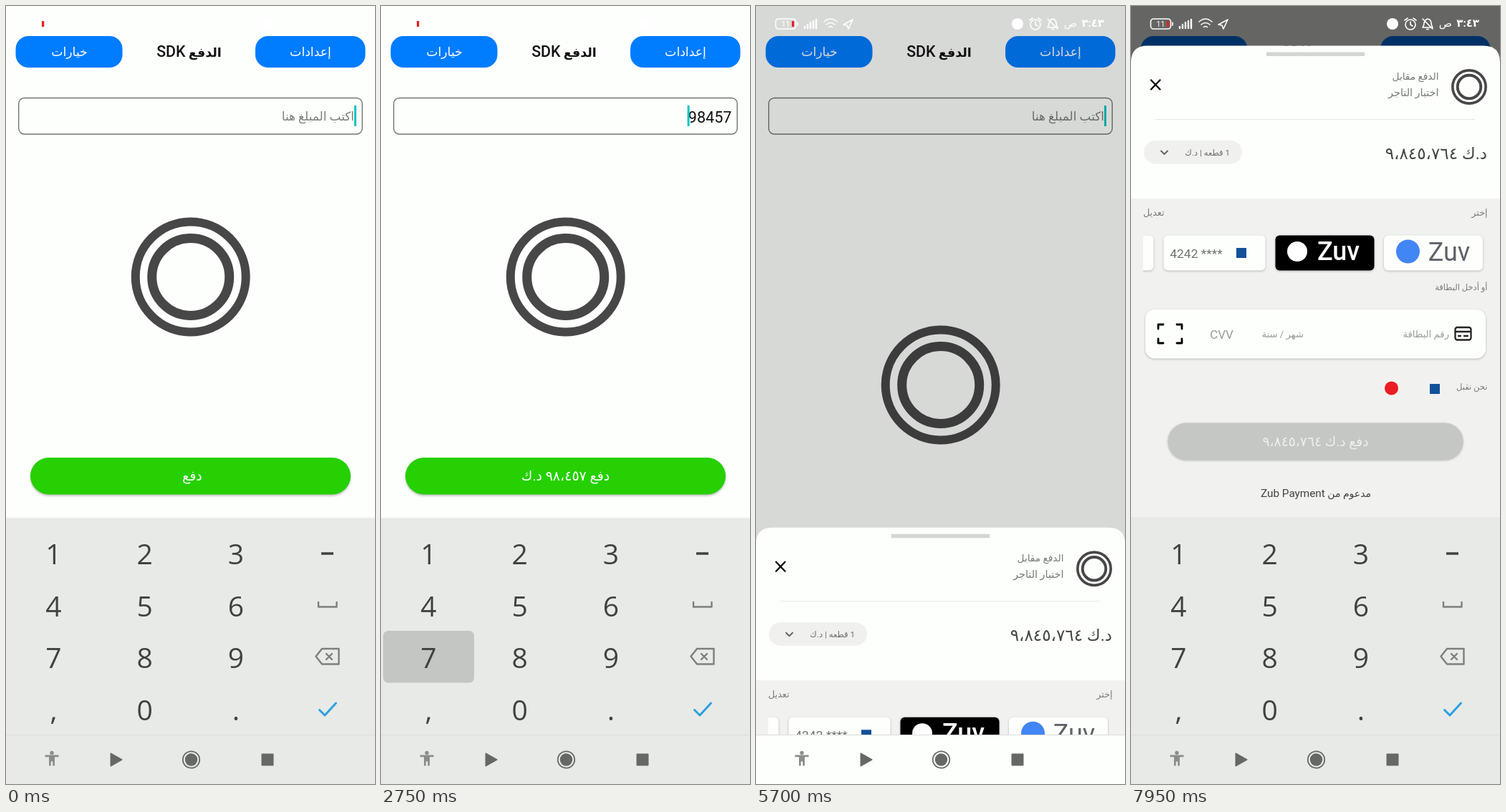
An HTML page that plays this animation: 515 by 1087 pixels, repeating every 8000 ms.

```html
<!DOCTYPE html>
<html lang="ar">
<head>
<meta charset="utf-8">
<title>الدفع</title>
<style>
html, body { margin: 0; width: 100%; height: 100%; overflow: hidden; background: #fdfffc; }
svg { display: block; width: 100%; height: 100%; direction: rtl; }
text { font-family: Roboto, "DejaVu Sans", sans-serif; }
.mid { text-anchor: middle; }
.left { text-anchor: end; }
.ltr { direction: ltr; }
.line { fill: none; stroke-linecap: round; stroke-linejoin: round; }
.card { filter: drop-shadow(0 1.5px 1.5px rgba(0,0,0,.25)); }
#keys text { font: 39px "Open Sans", "Noto Sans", sans-serif; fill: #404240; }
</style>
</head>
<body>
<svg viewBox="0 0 515 1087">
  <defs>
    <g id="rings" fill="none" stroke="#484747">
      <circle r="77" stroke-width="12"/>
      <circle r="54" stroke-width="13"/>
    </g>
    <clipPath id="view"><rect id="viewBox" width="515" height="1018"/></clipPath>
    <clipPath id="row"><rect x="17" y="610" width="498" height="75"/></clipPath>
    <clipPath id="pill"><rect id="pillBox" height="51.4" y="631" rx="25.7"/></clipPath>
  </defs>

  <rect width="515" height="1087" fill="#fdfffc"/>

  <g id="page">
    <g fill="#007cff">
      <rect x="13.5" y="42" width="149" height="44" rx="18"/>
      <rect x="348" y="42" width="153.500" height="44" rx="18"/>
    </g>
    <g class="mid" fill="#fff" font-size="17.3">
      <text x="88.500" y="70">خيارات</text>
      <text x="425" y="70">إعدادات</text>
    </g>
    <text class="mid" x="255.500" y="71" font-size="17.5" font-weight="600" fill="#111">الدفع <tspan font-size="21.3" font-weight="500">SDK</tspan></text>
    <rect x="17.700" y="128.500" width="479.500" height="50.500" rx="8" fill="none" stroke="#737573" stroke-width="1.4"/>
    <text id="hint" x="486" y="160" font-size="16.9" fill="#7c7e7c">اكتب المبلغ هنا</text>
    <text id="amount" class="ltr left" x="489.500" y="162.500" font-size="21.6" fill="#111"></text>
    <rect id="caret" y="139" width="3" height="29" fill="#05c5c1"/>
    <use id="logo" href="#rings"/>
    <g id="pay">
      <rect id="payBox" y="631" height="51.400" rx="25.700" fill="#26d003"/>
      <g clip-path="url(#pill)"><circle id="ripple" cx="257.500" cy="656.700" fill="#000"/></g>
      <text id="payText" class="mid" x="257.500" y="663" font-size="19" fill="#fff"></text>
    </g>
  </g>

  <rect id="dim" width="515" height="1087" fill="#000"/>

  <g id="status" stroke-width="1.600">
    <rect x="50" y="21" width="3.200" height="8" fill="#e22222"/>
    <g class="line" stroke="#fff">
      <rect x="27.500" y="18" width="28" height="14" rx="4"/>
      <path d="M58 23v4M122 26l13-7-6 13-2-5zM95 22q9-8 18 0M98 26q6-5 12 0M101.500 29.500q2.500-2 5 0"/>
      <path d="M68 31v-2M72 31v-5M76 31v-8M80 31v-10M84 31v-12" stroke-width="2.400"/>
      <circle cx="390" cy="26" r="7"/>
      <path d="M390 22v4l3 2M382 20l4-3M398 20l-4-3"/>
      <path d="M408 30h13q-2-3-2-6 0-5-5-6-4 1-5 6 0 3-2 6M412.500 32.500h3M407 18l14 14"/>
    </g>
    <circle cx="365" cy="25" r="8" fill="#fff"/>
    <g fill="#fff">
      <text class="mid" x="41.500" y="29" font-size="10.500">11</text>
      <text x="486" y="29" font-size="15" font-weight="700">٣:٤٣</text>
      <text x="448" y="29" font-size="15">ص</text>
    </g>
  </g>

  <g clip-path="url(#view)">
  <g id="sheet">
    <path d="M0 1100V380.500q0-23 23-23h469q23 0 23 23v719.500z" fill="#fdfffc"/>
    <rect y="571" width="515" height="529" fill="#f1f2f0"/>
    <rect x="189" y="366.500" width="137" height="5.500" fill="#d3d5d3"/>
    <path class="line" d="M28 405.500l12.500 13M40.500 405.500l-12.500 13" stroke="#000" stroke-width="2.300"/>
    <use href="#rings" transform="translate(472 415) scale(.301)"/>
    <g fill="#777977" font-size="13.700">
      <text x="429.500" y="405">الدفع مقابل</text>
      <text x="429.500" y="428" font-size="14.400">اختبار التاجر</text>
    </g>
    <path d="M34 460.500h446" stroke="#e4e6e3"/>
    <rect x="18" y="490" width="137" height="32.500" rx="16.250" fill="#f0f1ef"/>
    <path class="line" d="M42 504.500l4.500 4.500 4.500-4.500" stroke="#666" stroke-width="2"/>
    <text x="138" y="511" font-size="11.600" fill="#6d6f6d">1 قطعه | د.ك</text>
    <text x="497" y="516" font-size="23" fill="#444644">د.ك ٩،٨٤٥،٧٦٤</text>
    <g fill="#787a78" font-size="12.700">
      <text x="497.500" y="595">إختر</text>
      <text class="left" x="17" y="595">تعديل</text>
      <text x="497.500" y="699" font-size="11.500">أو أدخل البطاقة</text>
      <text x="497.500" y="838" font-size="11.500">نحن نقبل</text>
    </g>
    <g clip-path="url(#row)">
      <g class="card" fill="#fdfffc">
        <rect x="-100" y="622.500" width="131.500" height="49" rx="6"/>
        <rect x="45.500" y="622.500" width="142" height="49" rx="6"/>
        <rect x="201.500" y="622.500" width="138" height="49" rx="6" fill="#000"/>
        <rect x="353" y="622.500" width="138" height="49" rx="6"/>
      </g>
    </g>
    <text class="mid ltr" x="91" y="654" font-size="17.400" fill="#6f716f">4242 ****</text>
    <rect x="147" y="640" width="14" height="14" fill="#12509a"/>
    <circle cx="232" cy="645" r="14" fill="#fff"/>
    <text class="mid" x="289.500" y="657" font-size="36" font-weight="500" fill="#fff">Zuv</text>
    <circle cx="386.500" cy="645" r="16.500" fill="#4285f4"/>
    <text class="mid" x="444" y="658" font-size="36" fill="#5f6368">Zuv</text>
    <rect class="card" x="20" y="726" width="475" height="68.500" rx="13" fill="#fdfffc"/>
    <g class="line" stroke="#222" stroke-width="2.300">
      <rect x="452.500" y="751" width="22" height="17.500" rx="3"/>
      <path d="M453 757h21M457 763h3M465 763h5"/>
      <path d="M38 753v-6h7M64 747h7v6M71 767v6h-7M45 773h-7v-6" stroke="#000" stroke-width="2.800"/>
    </g>
    <g fill="#999b99">
      <text x="444" y="765" font-size="13.200">رقم البطاقة</text>
      <text x="241" y="765" font-size="13.200">شهر / سنة</text>
      <text class="mid" x="126.500" y="767" font-size="17">CVV</text>
    </g>
    <circle cx="363.500" cy="836" r="9.500" fill="#eb1c24"/>
    <rect x="417" y="830" width="14" height="14" fill="#12509a"/>
    <rect class="card" x="51.500" y="884.500" width="412" height="51.500" rx="25.700" fill="#c5c7c4"/>
    <text class="mid" x="257.500" y="917" font-size="18.800" fill="#eff0ee">دفع د.ك ٩،٨٤٥،٧٦٤</text>
    <text class="mid" x="258" y="988" font-size="14" fill="#414341">مدعوم من <tspan font-size="15.300">Zub Payment</tspan></text>
  </g>
  </g>

  <rect id="navBack" y="1018" width="515" height="69" fill="#fdfffc"/>
  <g id="keyboard">
    <rect y="714.500" width="515" height="2" fill="#000" opacity=".05"/>
    <rect y="716" width="515" height="380" fill="#e8eae7"/>
    <rect id="press" width="127" height="72.500" rx="7" fill="#c4c6c3"/>
    <g id="keys" class="mid"></g>
    <path d="M440 765h17" stroke="#404240" stroke-width="3.500"/>
    <g class="line" stroke="#7d7f7d" stroke-width="2.400">
      <path d="M436 833v6.500h25.500V833"/>
      <path d="M441 898h23.500v21.500H441l-8.500-10.750zM447 905l8 8M455 905l-8 8"/>
      <path d="M437.500 983.500l7.500 7.500 15.500-17" stroke="#2ba0e3" stroke-width="3"/>
    </g>
  </g>

  <path d="M0 1018.500h515" stroke="#dadcd9"/>
  <rect id="backGlow" x="98" y="1021" width="108" height="64" rx="32" fill="#000" opacity=".02"/>
  <g fill="#666866">
    <g fill="#8b8d8b">
      <circle cx="64" cy="1043.500" r="2.700"/>
      <path d="M54.500 1046.500h19v2.700h-5.500v12.300h-2.700v-6h-2.600v6H60v-12.300h-5.500z"/>
    </g>
    <path d="M146.500 1044.500l15 8.500-15 8.500z" stroke="#666866" stroke-width="2" stroke-linejoin="round"/>
    <circle cx="258.500" cy="1053" r="11.700" fill="none" stroke="#666866" stroke-width="1.800"/>
    <circle cx="258.500" cy="1053" r="8.700"/>
    <rect x="356.500" y="1044.500" width="17" height="17" rx="1"/>
  </g>
</svg>

<script>
const LOOP = 8000, TICK = 50, BLINK = 250;
const $ = id => document.getElementById(id);
const set = (id, attrs) => {
  for (const k in attrs) $(id).setAttribute(k, attrs[k]);
};
const show = (id, on) => set(id, { visibility: on ? 'visible' : 'hidden' });
const clamp = x => Math.max(0, Math.min(1, x));
const part = (t, from, to) => clamp((t - from) / (to - from));
const mix = (a, b, p) => a + (b - a) * p;
const easeOut = (p, k) => 1 - (1 - p) ** k;
const easeBoth = p => (1 - Math.cos(Math.PI * p)) / 2;

// Keypad: place of each key as column and row
const cells = {};
['123', '456', '789', ',0.'].forEach((line, row) => [...line].forEach((ch, col) => {
  cells[ch] = [col, row];
  const label = document.createElementNS('http://www.w3.org/2000/svg', 'text');
  label.setAttribute('x', 66.5 + col * 127.2);
  label.setAttribute('y', 780 + row * 72.6);
  label.textContent = ch;
  $('keys').append(label);
}));
cells.del = [3, 2];

// Field edits as [time, value] and key presses as [from, to, key]
const edits = [[-200, '']], presses = [];
function type(word, start, gap, hold) {
  [...word].forEach((ch, i) => {
    const at = start + i * gap;
    edits.push([at, word.slice(0, i + 1)]);
    presses.push([at - 50, at + hold, ch]);
  });
}
function erase(word, start, gap) {
  for (let i = 1; i <= word.length; i++) edits.push([start + (i - 1) * gap, word.slice(0, -i)]);
}
type('346764676', 550, 50, 50);
presses.push([1550, 2050, 'del']);
erase('346764676', 1700, 37.5);
type('9845764', 2350, 100, 50);
edits.push([3500, '9845764'], [5150, '']);

const arabic = n => n.replace(/\B(?=(\d{3})+$)/g, '،')
  .replace(/\d/g, d => String.fromCharCode(0x660 + +d));

function drawField(t) {
  const [since, value] = edits.filter(e => e[0] <= t).pop();
  const lit = t >= 5150 || Math.floor((t - since) / BLINK) % 2 === 0;
  $('amount').textContent = value;
  $('payText').textContent = value ? `دفع ${arabic(value)} د.ك` : 'دفع\u00a0';
  show('hint', !value);
  show('caret', lit);
  set('caret', { x: value ? 488.3 - 12.14 * value.length : 486 });
}

function drawPay(t, tall) {
  const shrink = easeBoth(part(t, 4712, 5112));
  const w = mix(447, 51.4, shrink), box = { x: 257.5 - w / 2, width: w };
  set('payBox', box);
  set('pillBox', box);
  set('payText', { opacity: 1 - part(t, 4450, 4700) });
  set('ripple', {
    r: 230 * easeOut(part(t, 3850, 4250), 2),
    opacity: t < 3900 ? 0 : 0.08 * (1 - part(t, 4250, 4700))
  });
  const lift = part(t, 3850, 4050) * (1 - part(t, 4550, 4750));
  $('payBox').style.filter = `drop-shadow(0 ${2 + 2 * lift}px ${1.5 + lift}px rgba(0,0,0,.25))`;
  set('pay', { transform: `translate(0 ${tall ? 302 : 0})` });
  set('logo', { transform: `translate(257.700 ${tall ? 529.5 : 378.5})` });
}

function drawSheet(t) {
  const open = part(t, 5650, 5850);
  let top = mix(1018, 358, easeOut(open, 2));
  if (t >= 7050) top = mix(358, 329, part(t, 7050, 7200));
  if (t >= 7625) top = mix(329, 48, easeBoth(part(t, 7625, 7850)));
  if (t >= 7850) top = mix(48, 56, easeBoth(part(t, 7850, 7950)));
  show('sheet', open > 0);
  set('sheet', { transform: `translate(0 ${top - 358})` });
  set('viewBox', { height: t >= 7050 ? 716.5 : 1018 });
  set('dim', { opacity: 0.6 * open });
}

function drawKeyboard(t) {
  const drop = t < 5000 ? part(t, 3450, 3600) : 1 - easeOut(part(t, 7150, 7350), 1.38);
  show('keyboard', drop < 1);
  set('keyboard', { transform: `translate(0 ${302 * drop})` });
  const hit = presses.filter(p => p[0] <= t && t < p[1]).pop();
  set('press', { opacity: hit ? 1 : 0 });
  if (hit) {
    const [col, row] = cells[hit[2]];
    set('press', { x: 3 + col * 127.3, y: 728 + row * 72.5 });
  }
}

function draw(t) {
  drawField(t);
  drawPay(t, t >= 3550 && t < 7050);
  drawSheet(t);
  drawKeyboard(t);
  show('backGlow', t >= 3500 && t < 3900);
}

const start = performance.now();
function loop() {
  const t = (performance.now() - start) % LOOP;
  draw(Math.floor(t / TICK) * TICK);
  requestAnimationFrame(loop);
}
loop();
</script>
</body>
</html>
```
